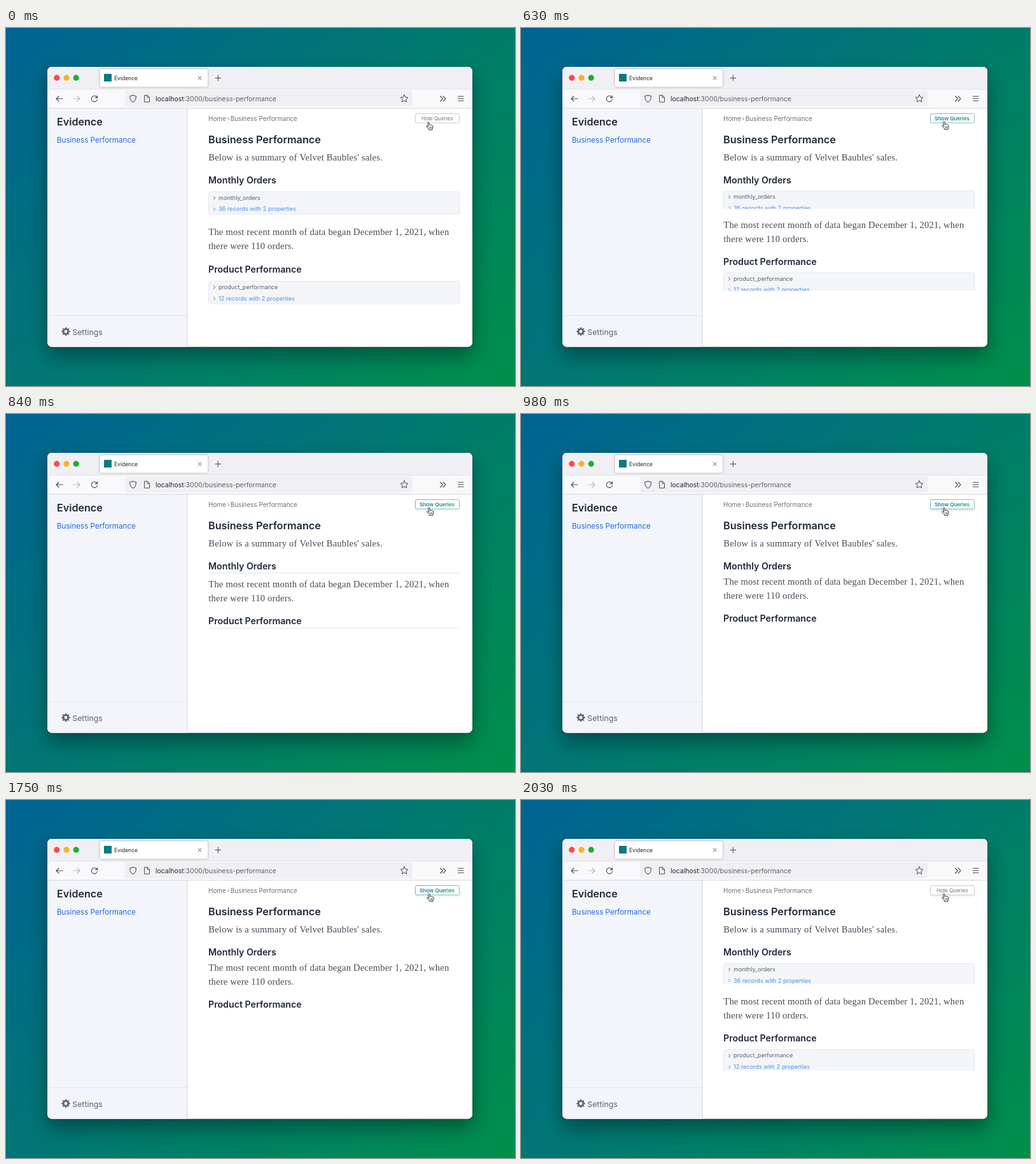
Recreate the animation shown at these times as an HTML page with a canvas. Size 800x562 px, loop 2.1 s.

```html
<!DOCTYPE html>
<html lang="en">
<head>
<meta charset="utf-8">
<title>Business Performance</title>
<style>
html, body { margin: 0; width: 100%; height: 100%; overflow: hidden; background: #007a6e; }
canvas { display: block; width: 800px; height: 562px; }
</style>
</head>
<body>
<canvas id="stage"></canvas>
<script>
const W = 800, H = 562, LOOP = 2100, STEP = 70;
const CLOSE_AT = 601, OPEN_AT = 1805, SLIDE = 400;
const SANS = 'Inter, sans-serif', SERIF = '"Liberation Serif", serif';
const INK = '#1f2937', BODY = '#454b56', MUTED = '#6b7078', BLUE = '#2268e0', ICON = '#4a4a52';

const canvas = document.getElementById('stage');
const ctx = canvas.getContext('2d');
const ratio = window.devicePixelRatio || 1;
canvas.width = W * ratio;
canvas.height = H * ratio;

const clamp = v => Math.max(0, Math.min(1, v));
const ramp = (t, from, to) => clamp((t - from) / (to - from));
const cubicOut = p => 1 - (1 - p) ** 3;

function gradient(x0, y0, x1, y1, from, to) {
  const g = ctx.createLinearGradient(x0, y0, x1, y1);
  g.addColorStop(0, from);
  g.addColorStop(1, to);
  return g;
}

function box(x, y, w, h, r, fill, stroke) {
  ctx.beginPath();
  ctx.roundRect(x, y, w, h, r);
  if (fill) { ctx.fillStyle = fill; ctx.fill(); }
  if (stroke) { ctx.strokeStyle = stroke; ctx.lineWidth = 1; ctx.stroke(); }
}

function shadowed(color, blur, dy, draw) {
  ctx.save();
  ctx.shadowColor = color;
  ctx.shadowBlur = blur * ratio;
  ctx.shadowOffsetY = dy * ratio;
  draw();
  ctx.restore();
}

function disc(x, y, r, fill) {
  ctx.beginPath();
  ctx.arc(x, y, r, 0, Math.PI * 2);
  ctx.fillStyle = fill;
  ctx.fill();
}

function line(d, color = ICON, width = 1.1) {
  ctx.strokeStyle = color;
  ctx.lineWidth = width;
  ctx.lineCap = ctx.lineJoin = 'round';
  ctx.stroke(new Path2D(d));
}

// y is the middle of the capital letters
function sans(str, x, y, size, color, weight = 400) {
  ctx.font = `${weight} ${size}px ${SANS}`;
  ctx.letterSpacing = '0px';
  ctx.fillStyle = color;
  ctx.fillText(str, x, y + size * 0.364);
  return x + ctx.measureText(str).width;
}

function serif(str, x, y) {
  ctx.font = `14.5px ${SERIF}`;
  ctx.letterSpacing = '0.23px';
  ctx.fillStyle = BODY;
  ctx.fillText(str, x, y + 4.8);
}

function gear(x, y) {
  const teeth = 8, path = new Path2D();
  for (let i = 0; i < teeth * 4; i++) {
    const a = (i - 0.5) / (teeth * 4) * Math.PI * 2;
    const r = i % 4 < 2 ? 6.9 : 5.2;
    path.lineTo(x + r * Math.cos(a), y + r * Math.sin(a));
  }
  path.closePath();
  path.moveTo(x + 2.4, y);
  path.arc(x, y, 2.4, 0, Math.PI * 2);
  ctx.fillStyle = '#646970';
  ctx.fill(path, 'evenodd');
}

function star(x, y, r) {
  let d = '';
  for (let i = 0; i < 10; i++) {
    const a = i * Math.PI / 5 - Math.PI / 2, k = i % 2 ? r * 0.48 : r;
    d += `${i ? 'L' : 'M'}${x + k * Math.cos(a)} ${y + k * Math.sin(a)}`;
  }
  line(d + 'Z', ICON, 1);
}

function backdrop() {
  // the axis of a 135 degree gradient across the stage
  const reach = (W + H) / 4;
  ctx.fillStyle = gradient(W / 2 - reach, H / 2 - reach, W / 2 + reach, H / 2 + reach, '#006394', '#008f4a');
  ctx.fillRect(0, 0, W, H);
  const frame = () => box(65, 61, 668, 439.5, 7, '#fff');
  shadowed('rgba(0,20,25,.45)', 32, 14, frame);
  shadowed('rgba(0,0,0,.4)', 2.5, 0.5, frame);
}

function browser() {
  ctx.save();
  ctx.beginPath();
  ctx.roundRect(65, 61, 668, 439.5, 7);
  ctx.clip();
  ctx.fillStyle = '#f0f0f4';
  ctx.fillRect(65, 61, 668, 35);
  ctx.fillStyle = '#f9f9fb';
  ctx.fillRect(65, 96, 668, 30);
  ctx.fillStyle = '#f4f5fa';
  ctx.fillRect(65, 126, 220, 375);
  ctx.fillStyle = '#e3e3e8';
  ctx.fillRect(65, 95.5, 668, 1);
  ctx.fillRect(65, 451, 220, 1);
  ctx.fillStyle = '#d3d5da';
  ctx.fillRect(65, 125.5, 668, 1);
  ctx.fillRect(284.5, 126, 1, 375);
  ctx.restore();

  disc(79.8, 78.2, 4.6, '#fc4b48');
  disc(95, 78.2, 4.6, '#fcb024');
  disc(110.2, 78.2, 4.6, '#1fad35');
  shadowed('rgba(0,0,0,.4)', 3, 0, () => box(147.5, 64.5, 169.5, 28, 3, '#fff'));
  ctx.fillStyle = '#0a7b80';
  ctx.fillRect(154, 72, 12, 12);
  sans('Evidence', 170, 79, 8.5, '#24242c');
  line('M302 76l5 5m0-5l-5 5', ICON, 0.9);
  line('M329 78.5h8.6M333.3 74.2v8.6', ICON, 1);

  line('M89 111H79m4-4l-4 4 4 4');
  line('M106 111h10m-4-4l4 4-4 4', '#b7b7bd');
  line('M142.6 108.2A4.6 4.6 0 1 0 143.5 112M143.6 106.2v3.2h-3.2');

  box(187, 98, 452, 25, 3, '#f0f0f4');
  line('M199.6 105.4l4.8 1.7c.2 4.2-1.3 7.6-4.8 9.4-3.5-1.8-5-5.2-4.8-9.4Z');
  line('M218 105.6h4.2l3.3 3.3v7.3H218ZM222 105.8v3.3h3.3', ICON, 1);
  const hostEnd = sans('localhost', 235, 111, 10.45, '#24242c');
  sans(':3000/business-performance', hostEnd, 111, 10.45, '#5f5f69');
  star(626, 111, 6.2);
  line('M682.5 107l4 4-4 4m4.5-8l4 4-4 4');
  line('M710.5 107.3h8.5m-8.5 3.5h8.5m-8.5 3.5h8.5');
}

function queryPanel(top, open, name, records) {
  if (open < 0.005) return;
  ctx.save();
  ctx.beginPath();
  ctx.rect(317, top - 0.5, 398, 37 * open);
  ctx.clip();
  box(318.5, top + 0.3, 394.5, 36, 4, '#f4f5f9', '#e4e6ec');
  line(`M326.5 ${top + 8}l2.2 2.2-2.2 2.2`, '#555b66', 1);
  sans(name, 334, top + 9.6, 9.1, '#5b616b');
  line(`M326.5 ${top + 25.5}l2.2 2.2-2.2 2.2`, '#4b8ff0', 1);
  sans(records, 334, top + 27.3, 9.1, '#4b8ff0');
  ctx.restore();
}

function page(open) {
  sans('Evidence', 80, 147, 16.1, INK, 600);
  sans('Business Performance', 80, 175.6, 11.63, BLUE);
  gear(94, 476.5);
  sans('Settings', 104.3, 477.2, 12.3, '#5c6168');

  sans('Home', 318, 142, 9.95, MUTED);
  line('M348.5 140.4l1.8 2-1.8 2', MUTED, 0.9);
  sans('Business Performance', 352.7, 142, 9.9, MUTED);
  sans('Business Performance', 318, 175, 16.2, INK, 600);
  serif("Below is a summary of Velvet Baubles' sales.", 318.3, 202.8);

  const shift = 57.4 * open;
  sans('Monthly Orders', 318, 238.6, 14.2, INK, 600);
  queryPanel(248.4 + 8.2 * open, open, 'monthly_orders', '36 records with 2 properties');
  serif('The most recent month of data began December 1, 2021, when', 318.3, 263.2 + shift);
  serif('there were 110 orders.', 318.3, 285.2 + shift);
  sans('Product Performance', 318, 321.2 + shift, 14.2, INK, 600);
  queryPanel(331.4 + shift + 8.2 * open, open, 'product_performance', '12 records with 2 properties');
}

function toggleButton(showing, lift) {
  const outline = gradient(644, 0, 712, 0, '#7fb0d6', '#82caa5');
  const tint = gradient(644, 0, 712, 0, '#1c70b8', '#1f9f64');
  shadowed(`rgba(40,60,90,${0.24 * lift})`, 5, 2, () => box(643.5, 134.5, 69, 14.5, 2, '#fff'));
  box(643.5, 134.5, 69, 14.5, 2, '#fff', showing ? outline : '#c9ccd2');
  if (showing) sans('Show Queries', 650, 141.7, 8.2, tint, 600);
  else sans('Hide Queries', 653, 141.7, 8.1, '#70757e');
}

function pointer(x, y) {
  ctx.save();
  ctx.translate(x, y);
  const hand = 'M2.4 1.6C2.3-.3 4.3-.3 4.6 1.4L5.2 4.8C6 4 7 4.2 7.3 5 8.2 4.4 9 4.8 9.2 5.6 10.2 5.2 11 6 10.9 7.2L10.3 9.6 9.6 12.6H4.6L3.6 10.4.6 7.4C0 6.4 1.2 5.6 2.2 6.4L3.4 7.4Z';
  ctx.fillStyle = '#fff';
  ctx.fill(new Path2D(hand));
  line(hand, '#25272b', 0.95);
  line('M5.7 8v2.5m1.5-2.5v2.5m1.5-2.5v2.5', '#25272b', 0.65);
  ctx.restore();
}

function openness(t) {
  if (t < CLOSE_AT) return 1;
  if (t < OPEN_AT) return 1 - cubicOut(ramp(t, CLOSE_AT, CLOSE_AT + SLIDE));
  return cubicOut(ramp(t, OPEN_AT, OPEN_AT + SLIDE));
}

// the button lifts on hover and sinks while pressed
function buttonLift(t) {
  if (t < CLOSE_AT) return ramp(t, 0, 280) * (1 - ramp(t, 500, CLOSE_AT));
  return ramp(t, 700, 1050) * (1 - ramp(t, 1700, OPEN_AT)) + 0.8 * ramp(t, 1890, 2100);
}

function render() {
  const t = Math.floor(performance.now() % LOOP / STEP) * STEP;
  ctx.setTransform(ratio, 0, 0, ratio, 0, 0);
  backdrop();
  browser();
  page(openness(t));
  toggleButton(t >= CLOSE_AT && t < OPEN_AT, buttonLift(t));
  const arrive = ramp(t, 0, 140);
  pointer(660.2 + arrive, 147.4 - 0.7 * arrive);
  requestAnimationFrame(render);
}
render();
</script>
</body>
</html>
```
